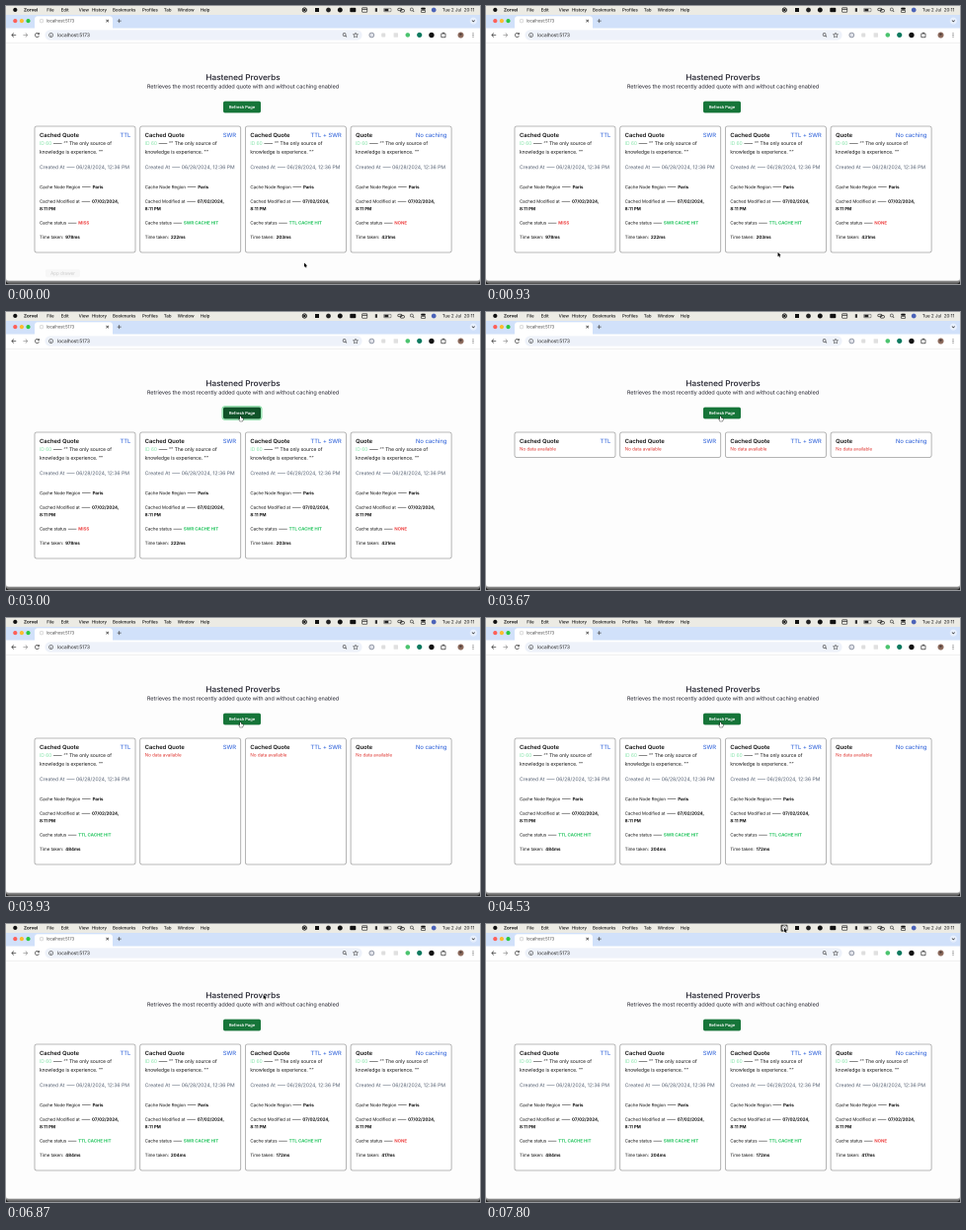
Recreate the animation shown at these times as an HTML page with a canvas. Size 480 by 282 pixels, loop 7.87 s.

```html
<!DOCTYPE html>
<html lang="en">
<head>
<meta charset="utf-8">
<title>Cached quotes</title>
<style>
html, body { margin: 0; width: 100%; height: 100%; overflow: hidden; background: #fdfdfd; }
canvas { display: block; width: 480px; height: 282px; }
</style>
</head>
<body>
<canvas id="stage"></canvas>
<script>
const W = 480, H = 282, LOOP = 7870, TICK = 1000 / 15;
const dpr = window.devicePixelRatio || 1;

// Drawn large and scaled down, so that tiny text keeps its true spacing
const ZOOM = 4;
const stage = document.getElementById('stage');
stage.width = W * dpr;
stage.height = H * dpr;
const out = stage.getContext('2d');
out.imageSmoothingQuality = 'high';
const screen4 = document.createElement('canvas');
screen4.width = W * ZOOM;
screen4.height = H * ZOOM;
const ctx = screen4.getContext('2d');
ctx.scale(ZOOM, ZOOM);

const INK = '#111', BLUE = '#2158d8', RED = '#e0342f', GREEN = '#22c55e';
const PRESS = 2870, RELEASE = 3260;

const cards = [
  { title: 'Cached Quote', mode: 'TTL', ready: 3770,
    before: ['MISS', '978ms'], after: ['TTL CACHE HIT', '484ms'] },
  { title: 'Cached Quote', mode: 'SWR', ready: 3970,
    before: ['SWR CACHE HIT', '222ms'], after: ['SWR CACHE HIT', '204ms'] },
  { title: 'Cached Quote', mode: 'TTL + SWR', ready: 4150,
    before: ['TTL CACHE HIT', '203ms'], after: ['TTL CACHE HIT', '172ms'] },
  { title: 'Quote', mode: 'No caching', ready: 4580,
    before: ['NONE', '431ms'], after: ['NONE', '417ms'] }
];

// Cursor stops: time, x, y
const stops = [
  [800, 302, 260.5], [1530, 228.3, 138.6], [1730, 228.3, 138.6],
  [2330, 237.5, 105.6], [6530, 237.5, 105.6], [7270, 291, 27], [7640, 302, 4]
];

function text(s, x, y, size, color = INK, weight = 400, align = 'left') {
  ctx.font = `${weight} ${size}px Inter, sans-serif`;
  ctx.textAlign = align;
  ctx.fillStyle = color;
  ctx.fillText(s, x, y);
}

function rect(x, y, w, h, color) {
  ctx.fillStyle = color;
  ctx.fillRect(x, y, w, h);
}

function paint(fill, stroke, width) {
  if (fill) { ctx.fillStyle = fill; ctx.fill(); }
  if (stroke) { ctx.strokeStyle = stroke; ctx.lineWidth = width; ctx.stroke(); }
}

function box(x, y, w, h, r, fill, stroke, width = 0.7) {
  ctx.beginPath();
  ctx.roundRect(x, y, w, h, r);
  paint(fill, stroke, width);
}

function dot(x, y, r, fill, stroke, width = 0.6) {
  ctx.beginPath();
  ctx.arc(x, y, r, 0, Math.PI * 2);
  paint(fill, stroke, width);
}

function line(points, color = '#444', width = 0.7) {
  ctx.beginPath();
  points.forEach(([x, y]) => ctx.lineTo(x, y));
  paint(null, color, width);
}

function dash(x, y, color = INK, w = 8.6) {
  line([[x, y], [x + w, y]], color, 0.5);
}

function lens(x, y, color = '#333') {
  dot(x, y, 1.5, null, color);
  line([[x + 1.1, y + 1.1], [x + 2.4, y + 2.4]], color);
}

function star(x, y, r) {
  const points = [];
  for (let i = 0; i <= 10; i++) {
    const a = -Math.PI / 2 + i * Math.PI / 5, d = i % 2 ? r * 0.45 : r;
    points.push([x + d * Math.cos(a), y + d * Math.sin(a)]);
  }
  line(points, '#444', 0.5);
}

function menuBar(t) {
  rect(0, 0, W, 9, '#ecebe4');
  dot(9.3, 3.9, 2.1, '#111');
  text('Zorvel', 18, 5.5, 4.5, INK, 700);
  const items = [['File', 41.3], ['Edit', 55.7], ['View', 73.7], ['History', 87], ['Bookmarks', 108],
    ['Profiles', 138], ['Tab', 159.8], ['Window', 173.7], ['Help', 196.8]];
  for (const [s, x] of items) text(s, x, 5.5, 4.35, INK, 500);

  const picked = t >= 7660;
  if (picked) box(298.5, 0.7, 7, 7, 1.2, '#4a4a48');
  dot(302.3, 4, 2.1, null, picked ? '#fff' : '#111', 0.9);
  rect(301.3, 3, 2, 2, picked ? '#fff' : '#111');

  rect(313, 2, 4, 4, '#111');
  dot(326.5, 4, 2.4, '#222');
  dot(338.3, 4, 2.5, '#111');
  box(348.3, 1.8, 6, 4.4, 1, '#111');
  box(360.6, 1.8, 5.2, 4.4, 0.7, null, '#333', 0.7);
  line([[361, 3.3], [365.6, 3.3]], '#333', 0.9);
  rect(373.8, 2.2, 2.2, 3.6, '#333');
  box(382.6, 2.2, 7.4, 3.7, 1, null, '#555', 0.5);
  rect(383.3, 2.9, 4, 2.3, '#222');
  box(396.8, 2.2, 4.2, 2.6, 1.2, null, '#222', 0.7);
  box(399.2, 3.5, 4.2, 2.6, 1.2, null, '#222', 0.7);
  lens(410.8, 3.5);
  box(420.2, 1.7, 4.6, 2, 1, '#111');
  box(420.2, 4.4, 4.6, 2, 1, null, '#111', 0.6);
  dot(433.2, 4, 2.4, '#4b63b8');
  text('Tue 2 Jul  20:11', 474.3, 5.6, 4.5, INK, 400, 'right');
}

function browserBar() {
  rect(0, 9, W, 13.5, '#d1e1fa');
  ['#ff5f57', '#febc2e', '#28c840'].forEach((c, i) => dot(9.3 + i * 6.6, 15.1, 2.1, c));
  box(29, 10.3, 79, 13, [3, 3, 0, 0], '#fff');
  dot(36, 15.1, 1.9, '#f6f6f6', '#c8c8c8', 0.5);
  text('localhost:5173', 41, 16.6, 4.2, '#444');
  line([[101.4, 13.8], [104, 16.4]]);
  line([[104, 13.8], [101.4, 16.4]]);
  line([[112.7, 15.1], [116.7, 15.1]]);
  line([[114.7, 13.1], [114.7, 17.1]]);
  dot(473.3, 15.1, 3.6, '#e8f0fe');
  line([[471.9, 14.5], [473.3, 15.9], [474.7, 14.5]], '#333');

  rect(0, 22.5, W, 15, '#fff');
  line([[10.2, 29.5], [5.8, 29.5]]);
  line([[7.8, 27.5], [5.8, 29.5], [7.8, 31.5]]);
  line([[17.4, 29.5], [21.8, 29.5]], '#999');
  line([[19.8, 27.5], [21.8, 29.5], [19.8, 31.5]], '#999');
  ctx.beginPath();
  ctx.arc(31.5, 29.5, 2, 0.4, 5.5);
  paint(null, '#444', 0.7);
  line([[33.5, 27], [33.5, 28.8], [31.7, 28.8]]);

  box(39.5, 24.4, 321, 10.2, 5.1, '#eef2fa');
  dot(45.6, 29.5, 2, null, '#444', 0.6);
  line([[45.6, 29.2], [45.6, 30.7]], '#444', 0.6);
  text('localhost:5173', 52, 31.2, 4.9, '#222');
  lens(342.6, 29);
  star(354, 29.6, 2.6);

  dot(370.3, 29.5, 2.4, '#dfe1e8', '#7d8494', 0.7);
  box(380.2, 27.5, 4, 4, 1, '#dedede');
  box(392.6, 27.3, 4.4, 4.4, 0.6, '#e0e0e0');
  dot(406.8, 29.4, 2.3, '#4cc46f');
  dot(418.7, 29.4, 2.6, '#0e7a5f');
  dot(430.9, 29.5, 2.7, '#111');
  box(440.8, 27.9, 4.2, 3.9, 0.6, null, '#444', 0.8);
  dot(443, 27.6, 0.9, '#444');
  dot(460.5, 29.5, 3, '#8c6a5c');
  dot(460.5, 28.7, 1.1, '#4a3a36');
  for (let i = -1; i < 2; i++) dot(473, 29.5 + i * 1.7, 0.5, '#333');
  line([[0, 37.6], [W, 37.6]], '#e6e6e6', 0.6);
}

function button(t) {
  const down = t >= PRESS && t < RELEASE;
  if (down) box(219, 95.7, 40, 13.6, 2.6, '#b9efcc', '#74d795', 0.8);
  box(220, 96.6, 38, 11.8, 1.8, down ? '#105329' : '#167539');
  text('Refresh Page', 239, 104, 4.1, '#fff', 600, 'center');
}

function details(x, [status, time]) {
  const pale = '#86e6ab', slate = '#566173';
  text('ID 60', x, 141, 4.85, pale);
  dash(x + 14, 139.4);
  text('“" The only source of', x + 24.3, 141, 4.85);
  text('knowledge is experience. "”', x, 149.7, 4.85);

  text('Created At', x, 165.2, 5.05, slate);
  dash(x + 27.5, 163.5, slate, 8);
  text('06/28/2024, 12:36 PM', x + 37, 165.2, 5.1, slate);

  text('Cache Node Region', x, 185.2, 4.4);
  dash(x + 43, 183.7);
  text('Paris', x + 53.6, 185.2, 4.4, INK, 700);

  text('Cached Modified at', x, 199.7, 4.4);
  dash(x + 42.6, 198.2);
  text('07/02/2024,', x + 53, 199.7, 4.4, INK, 700);
  text('8:11 PM', x, 207.2, 4.4, INK, 700);

  text('Cache status', x, 221.6, 4.4);
  dash(x + 28.8, 220.1);
  text(status, x + 39.2, 221.6, 4.4, status.endsWith('HIT') ? GREEN : '#ef4444', 700);

  text('Time taken:', x, 236.1, 4.4);
  text(time, x + 26.2, 236.1, 4.4, INK, 700);
}

function drawCards(t) {
  const empty = t >= RELEASE && t < cards[0].ready;
  cards.forEach((card, i) => {
    const x = 29 + i * 106.7;
    box(x, 122, 102, empty ? 25.4 : 128, 2, '#fff', '#a3a3a3', 0.8);
    text(card.title, x + 5, 133, 5.8, INK, 600);
    text(card.mode, x + 97.3, 133, 5.85, BLUE, 400, 'right');
    if (t < RELEASE) details(x + 5, card.before);
    else if (t >= card.ready) details(x + 5, card.after);
    else text('No data available', x + 5, 140.5, 4.55, RED);
  });
}

function bottomEdge(t) {
  const shade = ctx.createLinearGradient(0, 277.5, 0, H);
  shade.addColorStop(0, '#d8d8d8');
  shade.addColorStop(0.35, '#8c8c8c');
  shade.addColorStop(1, '#4c4c4c');
  rect(0, 277.5, W, 4.5, '#222');
  box(0, 270, W, 12, [0, 0, 4, 4], shade);
  box(0, 270, W, 8.6, [0, 0, 3, 3], '#fdfdfd');

  const fade = Math.max(0, 1 - t / 200);
  if (fade > 0) {
    ctx.globalAlpha = fade;
    box(40, 267.2, 35, 8, 2, '#f7f7f7');
    text('App drawer', 57.5, 272.8, 4.5, '#cacaca', 400, 'center');
    ctx.globalAlpha = 1;
  }
}

function cursorAt(t) {
  let prev = stops[0];
  for (const next of stops) {
    if (t < next[0]) {
      if (next === prev) break;
      const u = (t - prev[0]) / (next[0] - prev[0]);
      const e = u * u * (3 - 2 * u);
      return [prev[1] + (next[1] - prev[1]) * e, prev[2] + (next[2] - prev[2]) * e];
    }
    prev = next;
  }
  return [prev[1], prev[2]];
}

function cursor(t) {
  const [x, y] = cursorAt(t);
  const hand = x > 220 && x < 258 && y > 96.7 && y < 108.3;
  const shape = hand
    ? [[-0.5, 0.3], [0.4, 0.3], [0.6, 1.9], [2.6, 2.4], [2.4, 4.3], [1.9, 5.2], [-0.4, 5.2], [-1.6, 3.2], [-0.5, 3.1]]
    : [[0, 0], [0, 4.4], [1, 3.5], [1.7, 5], [2.5, 4.6], [1.8, 3.2], [3.1, 3.1]];
  ctx.save();
  ctx.translate(x, y);
  ctx.lineJoin = 'round';
  ctx.beginPath();
  shape.forEach(([a, b]) => ctx.lineTo(a, b));
  ctx.closePath();
  paint(null, hand ? '#111' : '#fff', 0.8);
  paint(hand ? '#fff' : '#000');
  ctx.restore();
}

function draw(t) {
  rect(0, 0, W, H, '#fdfdfd');
  menuBar(t);
  browserBar();
  text('Hastened Proverbs', 240, 75.2, 8.25, '#1c1c28', 500, 'center');
  text('Retrieves the most recently added quote with and without caching enabled',
    240, 83.5, 5.5, '#1c1c28', 400, 'center');
  button(t);
  drawCards(t);
  bottomEdge(t);
  cursor(t);
  out.drawImage(screen4, 0, 0, stage.width, stage.height);
}

const start = performance.now();
function frame() {
  const t = (performance.now() - start) % LOOP;
  draw(Math.floor((t + 4) / TICK) * TICK);
  requestAnimationFrame(frame);
}
frame();
</script>
</body>
</html>
```
